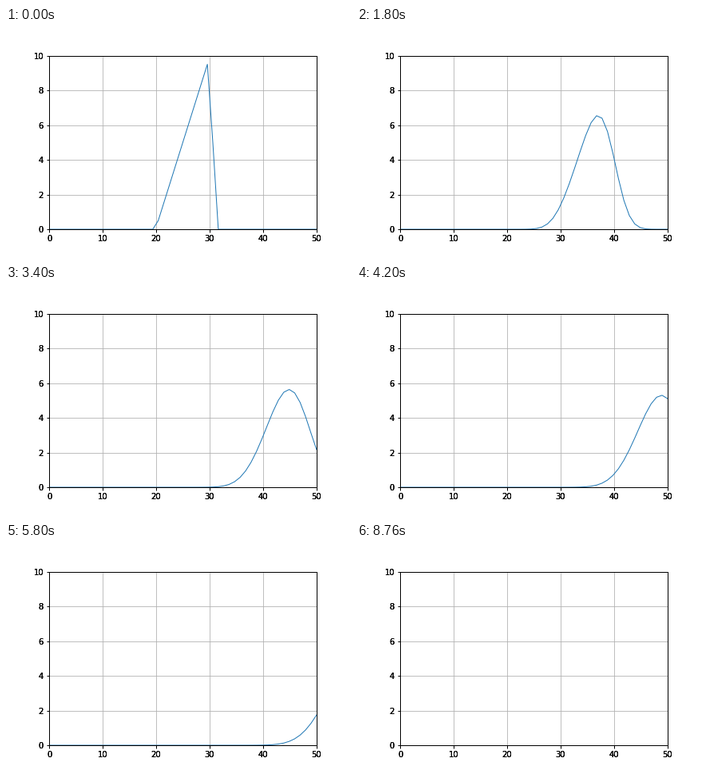
A matplotlib script that plays this animation: 432 by 288 pixels, repeating every 9520 ms.

```python
import numpy as np
import matplotlib.pyplot as plt
from matplotlib.animation import FuncAnimation

LOOP_MS = 9520
TICK_MS = 20
STEP_MS = 100       # one advection step per 100 ms
CLEAR_MS = 8760     # the curve disappears and the grid rests
COURANT = 0.5
LABEL_LAYERS = 3    # stacked labels give heavy, dark digits

plt.rcParams.update({
    "font.family": "DejaVu Sans",
    "font.size": 10,
    "axes.linewidth": 1.0,
    "xtick.major.width": 1.0,
    "ytick.major.width": 1.0,
})


def advect(u):
    """One first-order upwind step to the right."""
    out = u.copy()
    out[1:] -= COURANT * (u[1:] - u[:-1])
    return out


def solve(count):
    u = np.zeros(50)
    u[20:30] = np.arange(1, 11)
    waves = []
    for _ in range(count):
        u = advect(u)
        waves.append(u)
    return waves


def add_labels(ax, xticks, yticks):
    pad = 7
    xtrans, xva, xha = ax.get_xaxis_text1_transform(pad)
    ytrans, yva, yha = ax.get_yaxis_text1_transform(pad)
    for _ in range(LABEL_LAYERS):
        for x in xticks:
            ax.text(x, 0, str(x), transform=xtrans, va=xva, ha=xha)
        for y in yticks:
            ax.text(0, y, str(y), transform=ytrans, va=yva, ha=yha)


fig = plt.figure(figsize=(6, 4), dpi=72, facecolor="white")
fig.subplots_adjust(left=0.125, right=0.9, bottom=0.125, top=0.88)
ax = fig.add_subplot()
ax.set(xlim=(0, 50), ylim=(0, 10))

xticks, yticks = range(0, 51, 10), range(0, 11, 2)
ax.set_xticks(xticks)
ax.set_yticks(yticks)
ax.tick_params(labelbottom=False, labelleft=False)
ax.grid(color="#b0b0b0", linewidth=0.8)
add_labels(ax, xticks, yticks)

x = np.linspace(0, 50, 50)
waves = solve(CLEAR_MS // STEP_MS + 1)
line, = ax.plot(x, waves[0], color="#1f77b4", linewidth=1)


def update(frame):
    ms = frame * TICK_MS
    if ms < CLEAR_MS:
        line.set_data(x, waves[ms // STEP_MS])
    else:
        line.set_data([], [])
    return line,


anim = FuncAnimation(fig, update, frames=LOOP_MS // TICK_MS,
                     interval=TICK_MS, repeat=True, repeat_delay=0)
plt.show()
```
